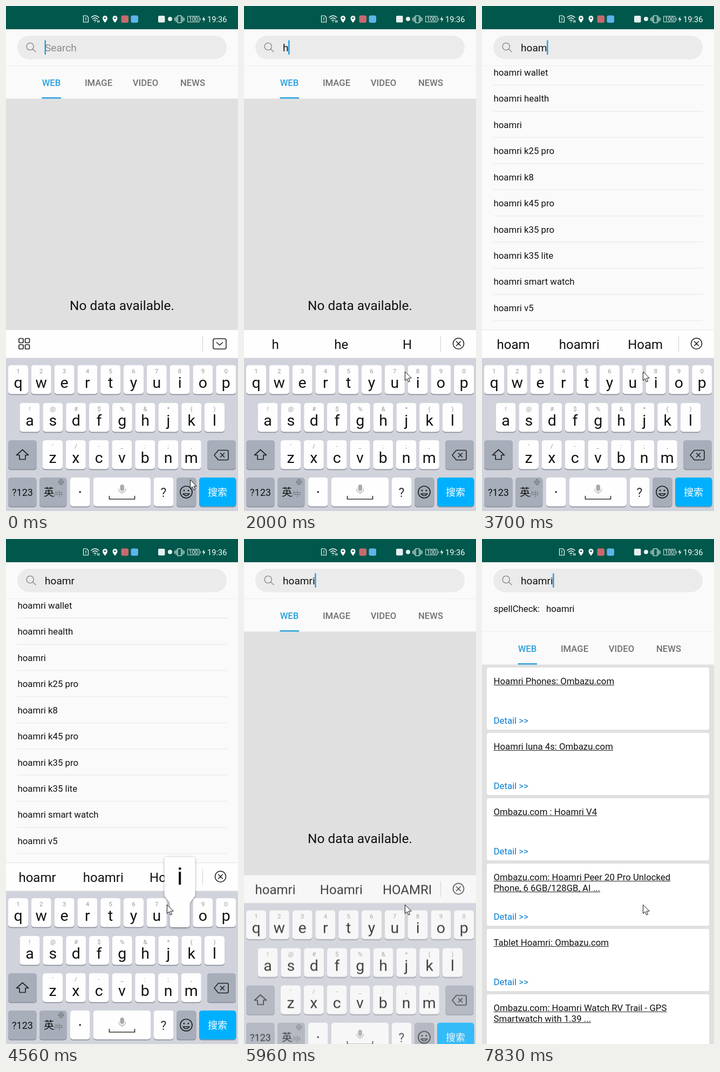
An HTML page with a canvas that plays this animation: 430x935 px, repeating every 8000 ms.

```html
<!DOCTYPE html>
<html lang="en">
<head>
<meta charset="utf-8">
<title>Search screen</title>
<style>
html, body { margin: 0; width: 100%; height: 100%; overflow: hidden; background: #e0e0e0; }
canvas { display: block; width: 430px; height: 935px; }
</style>
</head>
<body>
<canvas id="stage"></canvas>
<script>
const W = 430, H = 935, LOOP = 8000;
const WORD = 'hoamri', CAP = 'Hoamri', SHOP = 'Ombazu.com';
const BLUE = '#2aa0de';
const TEXT_DELAY = 115, POPUP_MS = 220, BLINK = 510;
const PRESS_AT = [1770, 2230, 2690, 3230, 3860, 4540];
const T = { list: 2080, refined: 3390, submit: 5880, spell: 6190, results: 6820 };

const firstList = [WORD + ' wallet', 'hen bay', 'halt us', 'hintbox', 'hi',
  'hazel court', 'h&amp;z', 'hivu', WORD, 'hebra'];
const refinedList = [' wallet', ' health', '', ' k25 pro', ' k8', ' k45 pro',
  ' k35 pro', ' k35 lite', ' smart watch', ' v5'].map(s => WORD + s);
const results = [
  [`${CAP} Phones: ${SHOP}`],
  [`${CAP} luna 4s: ${SHOP}`],
  [`${SHOP} : ${CAP} V4`],
  [`${SHOP}: ${CAP} Peer 20 Pro Unlocked`, 'Phone, 6 6GB/128GB, AI ...'],
  [`Tablet ${CAP}: ${SHOP}`],
  [`${SHOP}: ${CAP} Watch RV Trail - GPS`, 'Smartwatch with 1.39 ...'],
];

// Letter keys with the small hint above each
const keys = [];
[['qwertyuiop', '1234567890', 4, 665],
 ['asdfghjkl', '!@#$%&*()', 25.6, 735],
 ['zxcvbnm', "'/-_:;,", 68, 804]].forEach(([letters, hints, x, y]) =>
  [...letters].forEach((ch, i) => keys.push({ ch, hint: hints[i], x: x + 42.8 * i, y })));

const dpr = window.devicePixelRatio || 1;
function setup(canvas) {
  canvas.width = W * dpr;
  canvas.height = H * dpr;
  const ctx = canvas.getContext('2d');
  ctx.scale(dpr, dpr);
  return ctx;
}
const screen = setup(document.getElementById('stage'));
const board = setup(document.createElement('canvas'));
let c = screen;

const clamp = v => Math.min(1, Math.max(0, v));

function box(x, y, w, h, fill, r = 0) {
  c.fillStyle = fill;
  c.beginPath();
  c.roundRect(x, y, w, h, r);
  c.fill();
}
function text(s, x, y, size, color = '#111', align = 'left', weight = 400) {
  c.font = `${weight} ${size}px Roboto, "Noto Sans CJK SC", sans-serif`;
  c.fillStyle = color;
  c.textAlign = align;
  c.fillText(s, x, y);
}
function line(d, color, width = 1.5) {
  c.strokeStyle = color;
  c.lineWidth = width;
  c.lineJoin = c.lineCap = 'round';
  c.stroke(new Path2D(d));
}
function shape(d, color) {
  c.fillStyle = color;
  c.fill(new Path2D(d));
}
const ring = (x, y, r) => `M${x - r} ${y}a${r} ${r} 0 1 1 ${2 * r} 0a${r} ${r} 0 1 1 ${-2 * r} 0z`;

function statusBar() {
  box(0, 0, W, 43, '#00574b');
  line('M143.5 18h6l3 3v9h-9zM148 21.5v4M148 27.5v.3', '#fff', 1.2);
  line('M158 21q7-6 14 0M160.500 24q4.500-4 9 0M163 27q2-2 4 0M165 29.500v.3M170 27v3M172.500 27v3', '#fff', 1.4);
  for (const x of [183.5, 202])
    shape(`M${x} 31c-2-3-4.500-5-4.500-8.500a4.500 4.500 0 0 1 9 0c0 3.500-2.500 5.500-4.500 8.500z`, '#fff');
  shape(ring(183.5, 22.5, 1.6), '#00574b');
  shape(ring(202, 22.5, 1.6), '#00574b');
  box(213.5, 17.5, 13.5, 13.5, '#c9686f', 3);
  box(231.5, 17.5, 13.5, 13.5, '#5db4ea', 3);
  box(282, 18, 12.5, 12.5, '#e6efed', 2);
  shape(ring(304, 24, 4), '#e6efed');
  line('M318 18h7v13h-7zM315.500 20v9M327.500 20v9M313 22v5M330 22v5', '#fff', 1.2);
  line('M337 19h21v10.500h-21zM360.300 22.500v4', '#dfe9e7', 1);
  text('100', 347.5, 28, 10, '#fff', 'center');
  shape('M367.500 19l-4 6h3l-1 5 4-6.500h-3z', '#fff');
  text('19:36', 373, 29.5, 14.6, '#fff');
}

function searchField(t, typed, lastEdit) {
  box(0, 43, W, 68, '#fafafa');
  box(21, 55, 388, 43.5, '#ebebeb', 22);
  line(ring(44.7, 75, 6.6) + 'M49.500 79.800l5.500 5', '#858585', 1.3);
  text(typed || 'Search', 72, 84, 19.1, typed ? '#111' : '#8b8b8b');
  const x = 71.5 + (typed ? c.measureText(typed).width : 0);
  if (Math.floor((t - lastEdit) / BLINK) % 2 === 0) box(x, 63.5, 2.5, 26.5, BLUE);
}

function suggestions(list) {
  box(0, 110, W, H - 110, '#fafafa');
  list.forEach((s, i) => {
    const y = 129 + 48.43 * i;
    text(s, 21.5, y, 16.8);
    box(21, y + 17, 388, 1, '#e5e5e5');
  });
  box(0, 110, W, 1, '#eeeeee');
}

function page(spell, withResults) {
  const dy = spell ? 61 : 0;
  box(0, 110, W, 61.5 + dy, '#fafafa');
  if (spell) {
    text('spellCheck:', 21.5, 135, 16.8);
    text(WORD, 119, 135, 16.8);
  }
  box(0, 110 + dy, W, 1, '#eeeeee');
  [['WEB', 84], ['IMAGE', 171.5], ['VIDEO', 258.5], ['NEWS', 346]].forEach(([s, x], i) =>
    text(s, x, 148 + dy, 16.7, i ? '#717171' : BLUE, 'center', 500));
  box(66.5, 169 + dy, 35.5, 2.5, BLUE);
  if (!withResults) {
    text('No data available.', 215, 563 + dy / 2, 24.4, '#111', 'center');
    return;
  }
  results.forEach((title, i) => {
    const y = 238 + 121 * i;
    box(9, y, 412, 115, '#fff', 4);
    title.forEach((s, k) => {
      const base = y + 30.5 + 20 * k;
      text(s, 21.5, base, 16.8);
      box(21.5, base + 1.5, c.measureText(s).width, 1, '#222');
    });
    text('Detail >>', 21.5, y + 104, 16.8, '#0a7cd0');
  });
}

function keyCap(x, y, w, fill = '#fefefe') {
  box(x, y + 1.2, w, 54, '#8d929d', 5);
  box(x, y, w, 53.5, fill, 5);
}

function candidateBar(typed) {
  box(0, 599.5, W, 52, '#fefefe');
  box(0, 599, W, 1, '#e2e2e2');
  box(364, 611, 1, 29, '#cfcfcf');
  if (!typed) {
    for (const x of [24, 35.5]) for (const y of [615.5, 627]) {
      c.beginPath();
      c.roundRect(x, y, 8, 8, 2);
      c.strokeStyle = '#222';
      c.lineWidth = 1.7;
      c.stroke();
    }
    line('M387 616h18q3 0 3 3v13q0 3-3 3h-18q-3 0-3-3v-13q0-3 3-3zM390.500 623l5.500 5 5.500-5', '#222', 1.6);
    return;
  }
  const cap = 'H' + typed.slice(1);
  const guess = { h: 'he', ho: 'how' }[typed] || WORD;
  const words = typed === WORD ? [WORD, CAP, CAP.toUpperCase()] : [typed, guess, cap];
  words.forEach((s, i) => text(s, 58 + 122.3 * i, 634.5, 24, '#111', 'center'));
  line(ring(397.5, 625, 10) + 'M393.500 621l8 8M401.500 621l-8 8', '#222', 1.5);
}

function bubble({ ch, x, y }) {
  const d = `M${x - 5} ${y - 76}h47q5 0 5 5V${y - 7}q0 3-2 5l-6 8q-2 2-2 6V${y + 49}q0 5-5 5H${x + 5}q-5 0-5-5V${y + 12}q0-4-2-6l-6-8q-2-2-2-5V${y - 71}q0-5 5-5z`;
  c.save();
  c.shadowColor = 'rgba(0,0,0,.35)';
  c.shadowBlur = 4 * dpr;
  c.shadowOffsetY = dpr;
  shape(d, '#fefefe');
  c.restore();
  text(ch, x + 18.5, y - 25.5, 45, '#111', 'center');
}

function keyboard(typed, pressed) {
  const grey = '#a7aeba';
  c.clearRect(0, 0, W, H);
  box(0, 651, W, H - 651, '#d1d3dc');
  candidateBar(typed);
  for (const { ch, hint, x, y } of keys) {
    keyCap(x, y, 37);
    text(hint, x + 18.5, y + 14.5, 11.5, '#999', 'center');
    text(ch, x + 18.5, y + 42, 28.5, '#111', 'center');
  }
  keyCap(4, 804, 53, grey);
  line('M30.500 821.500l11 10h-5.500v8h-11v-8h-5.500z', '#222', 1.7);
  keyCap(373, 804, 53, grey);
  line('M393.500 822.500h16q2.500 0 2.500 2.500v13q0 2.500-2.500 2.500h-16l-7.500-9zM397.500 828l7 7M404.500 828l-7 7', '#222', 1.6);

  keyCap(4, 873, 52.5, grey);
  text('?123', 30.5, 907, 18, '#111', 'center');
  keyCap(62, 873, 50.5, grey);
  text('英', 79.5, 907, 19, '#111', 'center');
  text('/', 88, 909, 15, '#777');
  text('中', 92.5, 908, 13, '#777');
  line(ring(102, 881.5, 4.8) + 'M97.200 881.500h9.600M102 876.700q-4 4.800 0 9.600M102 876.700q4 4.800 0 9.600', '#666', .8);
  keyCap(119, 873, 36.5);
  box(135.5, 898, 3.4, 3.4, '#222', 1.7);
  keyCap(162, 873, 106);
  box(211.5, 886, 7.5, 12, '#aaa', 3.7);
  line('M208.800 894q0 6.500 6.400 6.500t6.400-6.500M215.200 901v2', '#aaa', 1.2);
  line('M191.500 907.500v5.500h47v-5.500', '#333', 1.7);
  keyCap(274, 873, 36.5);
  text('?', 292, 908.5, 23, '#333', 'center');
  keyCap(316, 873, 36.5, grey);
  line(ring(334, 900, 11) + 'M328 903q6 7.500 12 0z', '#222', 1.7);
  shape(ring(330, 897, 1.5) + ring(338, 897, 1.5), '#222');
  keyCap(358, 873, 68.5, '#00b0ff');
  text('搜索', 392, 907, 18, '#fff', 'center');
  if (pressed) bubble(pressed);
}

function pointer(t) {
  const p = clamp((t - 70) / 770), e = p * p * (3 - 2 * p);
  c.save();
  c.translate(341.5 - 43 * e, 877.5 - 200 * e);
  const d = 'M0 0v16l3.700-3.500 2.600 6 2.700-1.100-2.600-5.900h5z';
  shape(d, '#fff');
  line(d, '#111', 1);
  c.restore();
}

function draw(t) {
  const count = PRESS_AT.filter(p => t >= p + TEXT_DELAY).length;
  const typed = WORD.slice(0, count);
  const lastEdit = count ? PRESS_AT[count - 1] + TEXT_DELAY : -140;
  const press = PRESS_AT.findIndex(p => t >= p && t < p + POPUP_MS);
  const hide = clamp((t - T.submit) / 160);

  c = screen;
  box(0, 0, W, H, '#e0e0e0');
  statusBar();
  searchField(t, typed, lastEdit);
  if (t >= T.list && t < T.submit) suggestions(t < T.refined ? firstList : refinedList);
  else page(t >= T.spell, t >= T.results);

  if (hide < 1) {
    c = board;
    keyboard(typed, keys.find(k => k.ch === WORD[press]));
    c = screen;
    c.globalAlpha = 1 - .9 * hide * hide;
    c.drawImage(board.canvas, 0, 88 * hide * hide, W, H);
    c.globalAlpha = 1;
  }
  pointer(t);
}

const start = performance.now();
function frame() {
  draw((performance.now() - start) % LOOP);
  requestAnimationFrame(frame);
}
frame();
</script>
</body>
</html>
```
